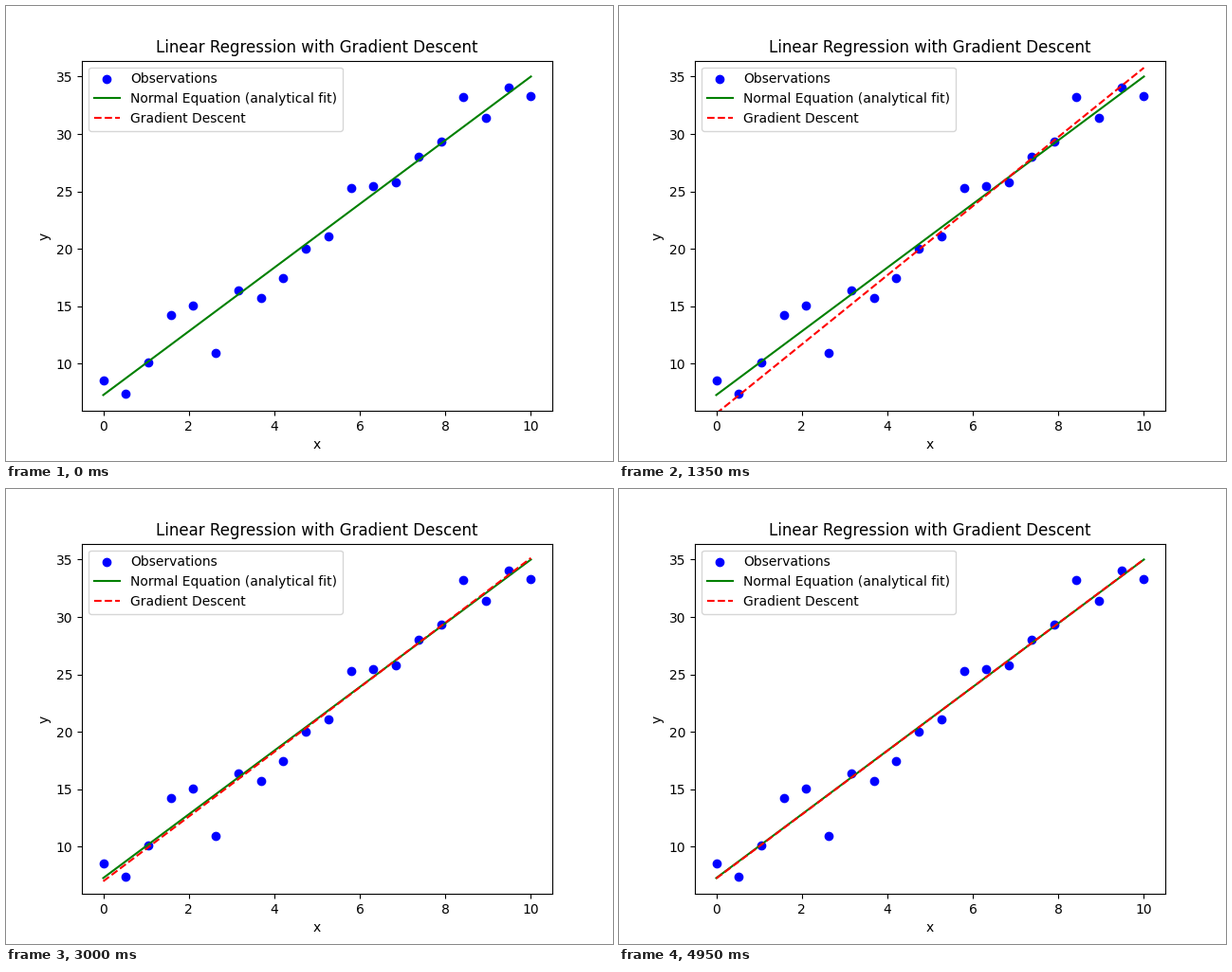
Animation, 640 px wide and 480 px high, one loop 5 s. Source, as a matplotlib script:

```python
import numpy as np
import matplotlib.pyplot as plt
from matplotlib.animation import FuncAnimation

FRAMES = 100
INTERVAL = 50  # ms
STEPS_PER_FRAME = 10
LEARNING_RATE = 0.01

# Noisy samples of a straight line
np.random.seed(0)
x = np.linspace(0, 10, 20)
y = 5 + 3 * x + 2 * np.random.randn(x.size)
X = np.column_stack([np.ones_like(x), x])

best = np.linalg.solve(X.T @ X, X.T @ y)


def descend(steps):
    """Return the parameters before each gradient step."""
    theta = np.zeros(2)
    history = []
    for _ in range(steps):
        history.append(theta)
        theta = theta - LEARNING_RATE * 2 / x.size * X.T @ (X @ theta - y)
    return history


history = descend(FRAMES * STEPS_PER_FRAME)

fig, ax = plt.subplots(figsize=(6.4, 4.8), dpi=100)
ax.scatter(x, y, color="blue", label="Observations")
ax.plot(x, X @ best, color="green", label="Normal Equation (analytical fit)")
fit_line, = ax.plot([], [], "r--", label="Gradient Descent")
ax.set_title("Linear Regression with Gradient Descent")
ax.set_xlabel("x")
ax.set_ylabel("y")
ax.legend(loc="upper left")


def update(frame):
    fit_line.set_data(x, X @ history[frame * STEPS_PER_FRAME])
    return fit_line,


anim = FuncAnimation(fig, update, frames=FRAMES, interval=INTERVAL,
                     repeat=True, repeat_delay=0)
plt.show()
```
